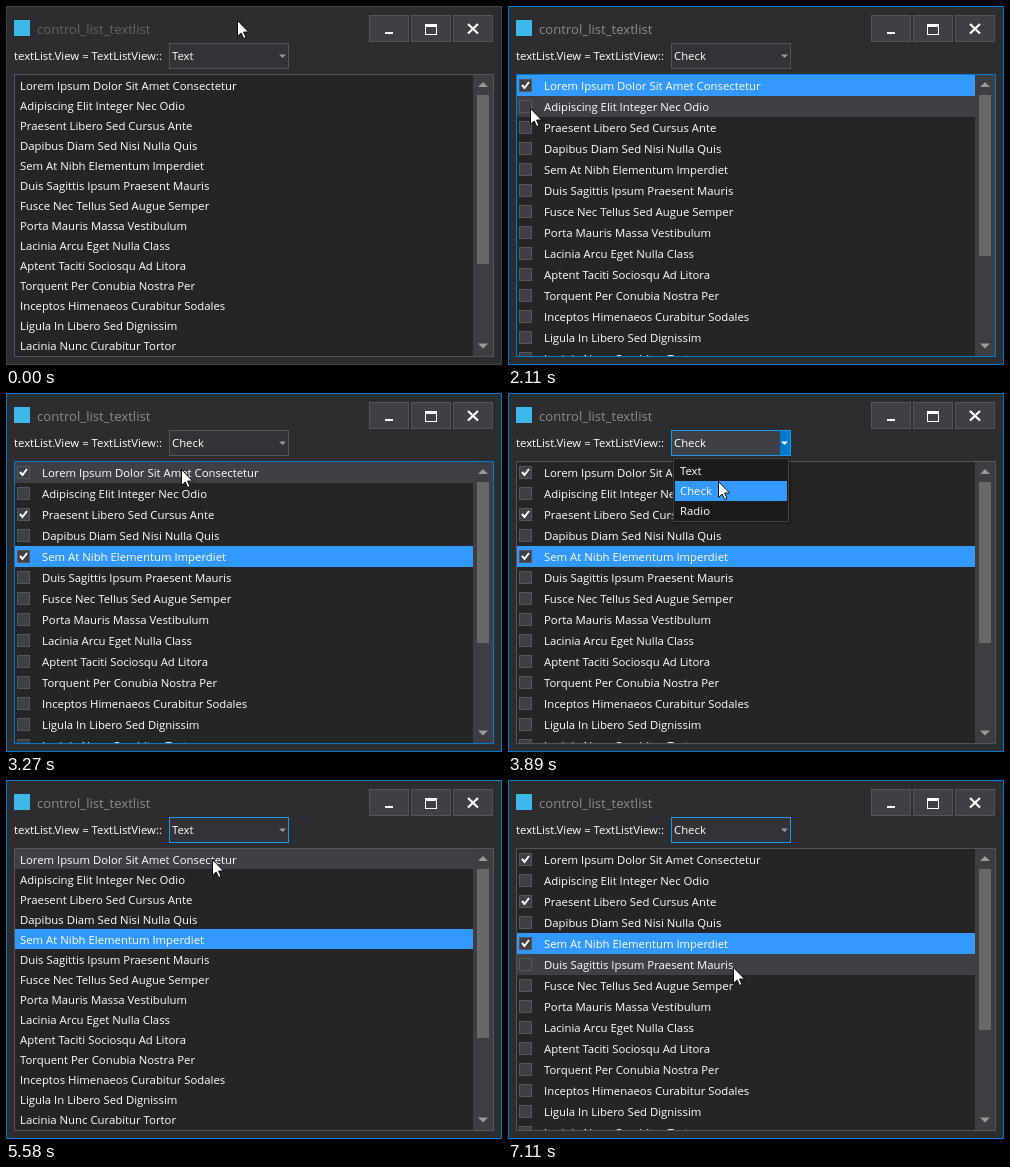
An HTML page for the animation above (7480 ms loop, 496 px wide and 359 px high).

```html
<!DOCTYPE html>
<html lang="en">
<head>
<meta charset="utf-8">
<title>control_list_textlist</title>
<style>
  html, body { margin: 0; width: 100%; height: 100%; overflow: hidden; background: #2d2d30; }
  svg { display: block; font: 11.35px "Open Sans", "Noto Sans", sans-serif; }
</style>
</head>
<body>
<svg id="stage" width="496" height="359" viewBox="0 0 496 359"></svg>
<script>
const LOOP = 7480;
const VIEWS = ['Text', 'Check', 'Radio'];
const ITEMS = [
  'Lorem Ipsum Dolor Sit Amet Consectetur', 'Adipiscing Elit Integer Nec Odio',
  'Praesent Libero Sed Cursus Ante', 'Dapibus Diam Sed Nisi Nulla Quis',
  'Sem At Nibh Elementum Imperdiet', 'Duis Sagittis Ipsum Praesent Mauris',
  'Fusce Nec Tellus Sed Augue Semper', 'Porta Mauris Massa Vestibulum',
  'Lacinia Arcu Eget Nulla Class', 'Aptent Taciti Sociosqu Ad Litora',
  'Torquent Per Conubia Nostra Per', 'Inceptos Himenaeos Curabitur Sodales',
  'Ligula In Libero Sed Dignissim', 'Lacinia Nunc Curabitur Tortor'
];
const TICKED = [0, 2, 4];

// Each click: time, view, popup open, focus, selected row, number of ticked rows
const CLICKS = [
  [0, 0, 0, '', -1, 0],
  [600, 0, 1, 'combo', -1, 0],
  [1190, 1, 0, 'combo', -1, 0],
  [1900, 1, 0, 'list', 0, 1],
  [2370, 1, 0, 'list', 2, 2],
  [2930, 1, 0, 'list', 4, 3],
  [3630, 1, 1, 'combo', 4, 3],
  [4330, 2, 0, 'combo', 4, 3],
  [4980, 2, 1, 'combo', 4, 3],
  [5450, 0, 0, 'combo', 4, 3],
  [5900, 0, 1, 'combo', 4, 3],
  [6510, 1, 0, 'combo', 4, 3]
];

// Pointer path: time, x, y
const PATH = [
  [0, 231, 14], [170, 231, 14], [560, 236, 50], [680, 236, 50], [930, 206, 83],
  [1010, 203, 92], [1210, 203, 92], [1860, 22, 74], [1990, 22, 74], [2110, 22, 102],
  [2190, 21, 121], [2400, 21, 121], [2620, 3, 156], [2720, 3, 156], [2930, 17, 163],
  [3070, 17, 163], [3270, 175, 76], [3500, 258, 50], [3650, 258, 50], [3850, 212, 78],
  [4010, 206, 117], [4430, 206, 117], [4600, 202, 98], [4840, 240, 50], [5000, 240, 50],
  [5310, 205, 78], [5450, 205, 78], [5580, 206, 79], [5800, 240, 50], [5920, 240, 50],
  [6160, 207, 83], [6280, 205, 96], [6600, 205, 96], [6640, 206, 97], [6870, 206, 97],
  [7110, 225, 187], [LOOP, 225, 187]
];

function pointer(t) {
  const i = PATH.findIndex(p => p[0] > t);
  const [t0, x0, y0] = PATH[i - 1], [t1, x1, y1] = PATH[i];
  const k = (t - t0) / (t1 - t0);
  return [Math.round(x0 + (x1 - x0) * k), Math.round(y0 + (y1 - y0) * k)];
}

const inside = ([px, py], x, y, w, h) => px >= x && px < x + w && py >= y && py < y + h;
const rect = (x, y, w, h, fill) => `<rect x="${x}" y="${y}" width="${w}" height="${h}" fill="${fill}"/>`;
const box = (x, y, w, h, fill, line) => rect(x, y, w, h, line) + rect(x + 1, y + 1, w - 2, h - 2, fill);
const path = (d, fill, extra = '') => `<path d="${d}" fill="${fill}" ${extra}/>`;
const text = (x, y, s, fill = '#fff', size = 11.35) =>
  `<text x="${x}" y="${y}" fill="${fill}" font-size="${size}">${s}</text>`;

function titleBar(active) {
  return box(0, 0, 496, 359, '#2d2d30', active ? '#007acc' : '#434346') +
    rect(8, 14, 16, 16, '#3db8e8') +
    text(31, 28, 'control_list_textlist', active ? '#8c8c8c' : '#656565', 13.15) +
    [363, 405, 447].map(x => box(x, 9, 40, 27, '#3f3f46', '#54545c')).join('') +
    rect(379, 26, 8, 2, '#fff') +
    path('M419 18H431V29H419ZM420 21V28H430V21Z', '#fff', 'fill-rule="evenodd"') +
    path('M462 18L472 27.5M472 18L462 27.5', 'none', 'stroke="#fff" stroke-width="2.2"');
}

function combo(view, open, focused, hover) {
  const lit = open || hover;
  return text(8, 54, 'textList.View = TextListView::') +
    box(163, 37, 120, 26, lit ? '#3f3f46' : '#333337', focused ? '#1c97ea' : '#54545c') +
    (lit ? rect(272, 38, 10, 24, open ? '#007acc' : '#1f1f20') : '') +
    path('M273 48.500H280L276.500 52Z', open ? '#fff' : hover ? '#1c97ea' : '#999') +
    text(166, 54, VIEWS[view]);
}

function mark(view, y, on) {
  if (view === 1) {
    return box(11, y + 4, 13, 13, '#3f3f46', '#55555c') +
      (on ? path(`M14 ${y + 10}L16.500 ${y + 13}L21 ${y + 7}`, 'none', 'stroke="#fff" stroke-width="2"') : '');
  }
  return `<circle cx="17.5" cy="${y + 10.5}" r="6.5" fill="#3f3f46" stroke="#55555c"/>` +
    (on ? `<circle cx="17.5" cy="${y + 10.5}" r="3.5" fill="#fff"/>` : '');
}

function list(view, focused, selected, ticks, at) {
  const pitch = view ? 21 : 20;
  const hover = at && inside(at, 9, 69, 458, 281) ? Math.floor((at[1] - 69) / pitch) : -1;
  const ticked = TICKED.slice(0, ticks);
  const rows = ITEMS.map((item, i) => {
    const y = 69 + i * pitch;
    const back = i === selected ? '#3399ff' : i === hover ? '#3f3f46' : '';
    return (back ? rect(9, y, 458, pitch, back) : '') +
      (view ? mark(view, y, ticked.includes(i)) : '') +
      text(view ? 36 : 14, y + 15, item);
  });
  return box(8, 68, 480, 283, '#252526', focused ? '#007acc' : '#54545c') +
    `<clipPath id="inner"><rect x="9" y="69" width="478" height="281"/></clipPath>` +
    `<g clip-path="url(#inner)">${rows.join('')}</g>` +
    rect(467, 69, 20, 281, '#3e3e42') +
    rect(471, 89, 12, view ? 161 : 169, '#686868') +
    path('M472 81L477 76L482 81ZM472 337.500H482L477 342.500Z', '#999');
}

function popup(view, at) {
  const hover = inside(at, 167, 68, 112, 60) ? Math.floor((at[1] - 68) / 20) : -1;
  return rect(164, 64, 119, 67, '#0004') + box(165, 65, 116, 64, '#1b1b1c', '#434346') +
    VIEWS.map((name, i) => {
      const back = i === view ? '#3399ff' : i === hover ? '#3f3f46' : '#1b1b1c';
      return rect(167, 68 + i * 20, 112, 20, back) + text(172, 82 + i * 20, name);
    }).join('');
}

function draw(t) {
  const [since, view, open, focus, selected, ticks] = CLICKS.findLast(c => c[0] <= t);
  const at = pointer(t);
  // Row hover only refreshes once the pointer moves after a click
  const moved = String(at) !== String(pointer(since));
  return titleBar(focus !== '') +
    combo(view, open, focus === 'combo', inside(at, 163, 37, 120, 26)) +
    list(view, focus === 'list', selected, ticks, !open && moved ? at : null) +
    (open ? popup(view, at) : '') +
    path('M.5 .5V16.500L4.200 13L6.700 18.500L9 17.500L6.500 12H11.500Z', '#fff',
      `stroke="#000" stroke-width=".9" transform="translate(${at})"`);
}

const stage = document.getElementById('stage');
const start = performance.now();
let shown = '';
function tick() {
  const next = draw((performance.now() - start) % LOOP);
  if (next !== shown) stage.innerHTML = shown = next;
  requestAnimationFrame(tick);
}
tick();
</script>
</body>
</html>
```
